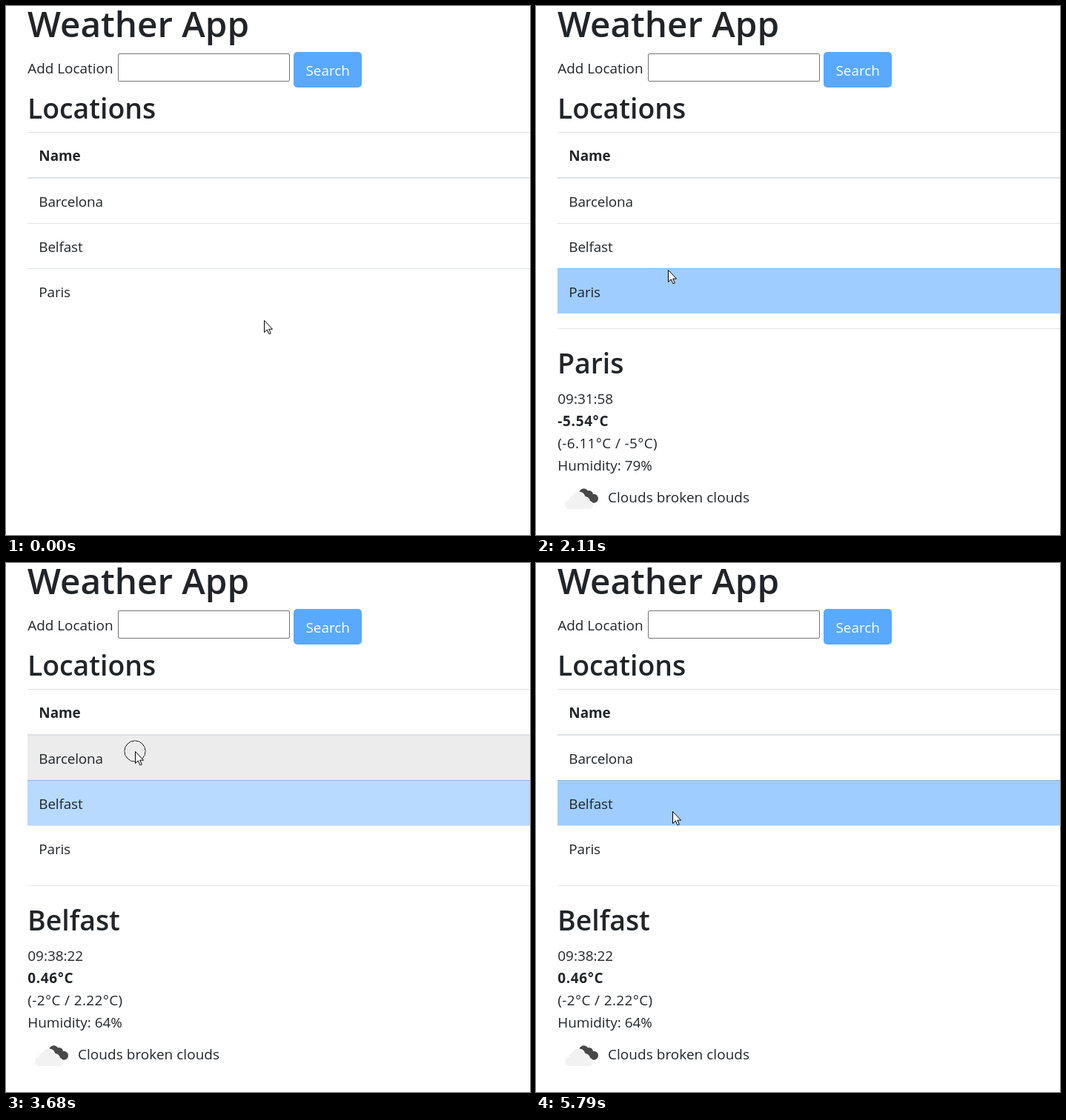
Animation of 707 by 714 pixels, one loop 5.86 s. Source, as an HTML page:

```html
<!DOCTYPE html>
<html lang="en">
<head>
<meta charset="utf-8">
<title>Weather App</title>
<style>
  html, body { margin: 0; width: 100%; height: 100%; overflow: hidden; background: #fff; }
  svg { display: block; }
  text { font: 18.9px "Open Sans", "Noto Sans", sans-serif; fill: #212529; white-space: pre; }
  .h1 { font-size: 47.6px; font-weight: 600; }
  .h2 { font-size: 37.4px; font-weight: 600; }
  .bold { font-weight: 700; }
  .cell { letter-spacing: -.15px; }
  .line { fill: #dee2e6; }
  .cloud { fill: #f2f2f2; }
</style>
</head>
<body>
<svg width="707" height="714">
  <text class="h1" x="29" y="42">Weather App</text>
  <text x="29.3" y="91">Add Location</text>
  <rect x="151.5" y="64.5" width="231" height="37" rx="1.5" fill="#fff" stroke="#767676"/>
  <rect x="388" y="62" width="92" height="48" rx="5" fill="#59a9ff"/>
  <text x="404.5" y="94" style="fill:#fff">Search</text>
  <text class="h2" x="29" y="152">Locations</text>

  <rect class="line" x="29" y="170" width="678" height="1"/>
  <text class="bold" x="44.3" y="209">Name</text>
  <g id="rows"></g>
  <rect class="line" x="29" y="231" width="678" height="2"/>

  <g id="details">
    <rect x="29" y="435" width="678" height="1" fill="#e5e5e5"/>
    <text id="city" class="h2" x="29" y="496"></text>
    <text id="clock" x="29.3" y="537"></text>
    <text id="temp" class="bold" x="29.3" y="567" letter-spacing=".7"></text>
    <text id="range" x="29.3" y="597" letter-spacing=".4"></text>
    <text id="humidity" x="29.3" y="627"></text>
    <text id="sky" letter-spacing=".08"></text>
    <g id="broken">
      <g fill="#484848">
        <circle cx="64.5" cy="657.5" r="6.3"/>
        <circle cx="71.5" cy="659.5" r="5.5"/>
        <circle cx="78" cy="664.8" r="6"/>
      </g>
      <path class="cloud" d="M45.5 679a6 6 0 0 1-1-12a6 6 0 0 1 5-6a9 9 0 0 1 17 1a6 6 0 0 1 6 6a5.6 5.6 0 0 1 0 11z"/>
    </g>
    <path id="scattered" class="cloud" d="M47 677.5a5.5 5.5 0 0 1-.5-11a5.5 5.5 0 0 1 4-6a8.6 8.6 0 0 1 16-.5a6 6 0 0 1 6 6.5a5.6 5.6 0 0 1 1.5 11z"/>
  </g>

  <g id="cursor">
    <g id="ring" fill="none">
      <circle r="14" stroke="#000"/>
      <circle r="13" stroke="#fff"/>
    </g>
    <path d="M.5 .5V16.5L4.3 13L7 18.8L9.3 17.8L6.7 12.2H11.5Z" fill="#fff" stroke="#000"/>
  </g>
</svg>
<script>
const LOOP = 5860;
const TICK = 74; // the pointer moves once per tick
const ROW_TOP = 232, ROW_HEIGHT = 61;
const REPORT_SHOWN = 870, ICON_SHOWN = 1020;

const CITIES = [
  { name: "Barcelona", edge: "#dee2e6", clock: "09:38:46", temp: "10.39°C",
    range: "(9°C / 12.22°C)", humidity: "76%", sky: "scattered" },
  { name: "Belfast", edge: "#8ab4dc", clock: "09:38:22", temp: "0.46°C",
    range: "(-2°C / 2.22°C)", humidity: "64%", sky: "broken" },
  { name: "Paris", edge: "#7abaff", clock: "09:31:58", temp: "-5.54°C",
    range: "(-6.11°C / -5°C)", humidity: "79%", sky: "broken" },
];

const HOME = { x: 348, y: 424 };
const GLIDES = [
  { start: 80, steps: 6, x: 182, y: 385 },
  { start: 2030, steps: 6, x: 175, y: 332 },
  { start: 2900, steps: 3, x: 175, y: 271 },
  { start: 3122, steps: 2, x: 174, y: 254 },
  { start: 5010, steps: 1, x: 181, y: 314 },
  { start: 5084, steps: 3, x: 183, y: 333 },
  { start: 5790, steps: 1, x: 184, y: 335 },
];

const CLICKS = [
  { press: 600, select: 690, load: REPORT_SHOWN, city: 2 },
  { press: 2420, select: 2570, load: 2650, city: 1 },
  { press: 3680, select: 3830, load: 3980, city: 0 },
  { press: 5300, select: 5470, load: 5620, city: 1 },
];

const $ = id => document.getElementById(id);
const show = (id, on) => $(id).setAttribute("visibility", on ? "inherit" : "hidden");
const rowTop = i => ROW_TOP + i * ROW_HEIGHT;
const easeOut = p => 1 - (1 - p) ** 2;

$("rows").innerHTML = CITIES.map(({ name }, i) => `
  <rect id="fill${i}" x="29" y="${rowTop(i)}" width="678" height="${ROW_HEIGHT}"/>
  <rect id="edge${i}" x="29" y="${rowTop(i)}" width="678" height="1"/>
  <text class="cell" x="44.3" y="${rowTop(i) + 39}">${name}</text>`).join("");

function pointer(t) {
  let { x, y } = HOME;
  for (const glide of GLIDES) {
    if (t < glide.start) break;
    const step = Math.floor((t - glide.start) / TICK) + 1;
    const p = easeOut(Math.min(1, step / glide.steps));
    x += (glide.x - x) * p;
    y += (glide.y - y) * p;
  }
  return { x: Math.round(x), y: Math.round(y) };
}

function draw(t) {
  const { x, y } = pointer(t);
  const selected = CLICKS.findLast(click => t >= click.select)?.city;
  const loaded = CLICKS.findLast(click => t >= click.load)?.city;
  const hovered = Math.floor((y - ROW_TOP) / ROW_HEIGHT);

  CITIES.forEach(({ edge }, i) => {
    const [plain, hover] = i === selected ? ["#b8daff", "#9fcdff"] : ["#fff", "#ececec"];
    $("fill" + i).setAttribute("fill", i === hovered ? hover : plain);
    $("edge" + i).setAttribute("fill", i === selected ? edge : "#dee2e6");
  });

  $("cursor").setAttribute("transform", `translate(${x} ${y})`);
  show("ring", CLICKS.some(({ press, select }) => t >= press && t < select));

  show("details", t >= REPORT_SHOWN);
  if (t < REPORT_SHOWN) return;
  const report = CITIES[loaded];
  $("city").textContent = CITIES[selected].name;
  $("clock").textContent = report.clock;
  $("temp").textContent = report.temp;
  $("range").textContent = report.range;
  $("humidity").textContent = "Humidity: " + report.humidity;

  // The description moves aside once the icon has loaded.
  const icon = t >= ICON_SHOWN;
  $("sky").textContent = `Clouds ${report.sky} clouds`;
  $("sky").setAttribute("x", icon ? 97 : 34.6);
  $("sky").setAttribute("y", icon ? 670 : 657);
  for (const kind of ["broken", "scattered"]) show(kind, icon && report.sky === kind);
}

const start = performance.now();
function tick() {
  draw((performance.now() - start) % LOOP);
  requestAnimationFrame(tick);
}
tick();
</script>
</body>
</html>
```
